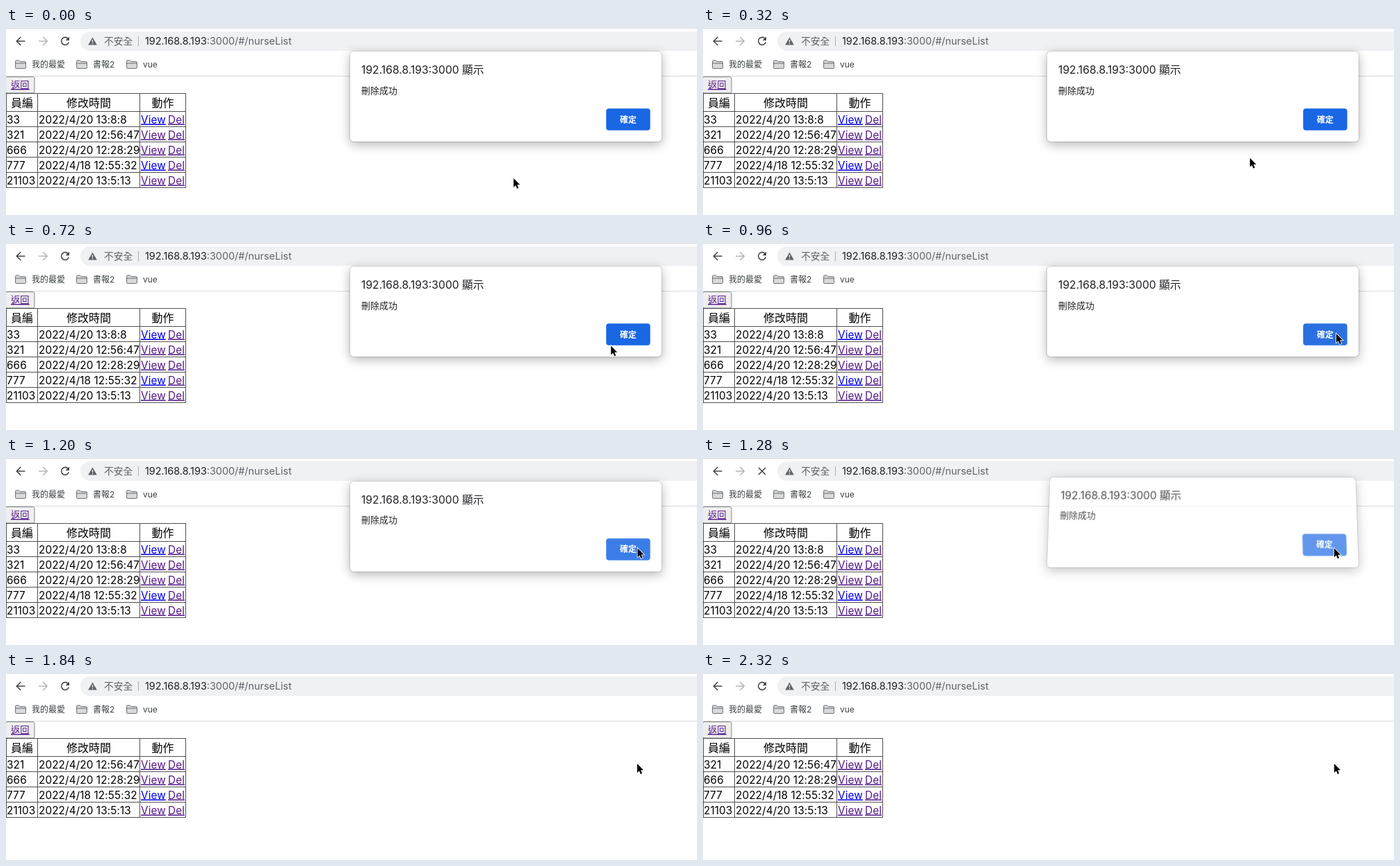
An HTML page that plays this animation: 994x270 px, repeating every 2.4 s.

```html
<!DOCTYPE html>
<html lang="zh-Hant">
<head>
<meta charset="utf-8">
<title>nurseList</title>
<style>
  html, body { margin: 0; width: 100%; height: 100%; overflow: hidden; background: #fff; }
  body { position: relative; }
  svg { position: absolute; left: 0; top: 0; display: block; overflow: visible; }
  text { font-family: Inter, "Noto Sans CJK TC", "Noto Sans CJK", sans-serif; white-space: pre; }
  .icon { fill: none; stroke: #45494d; stroke-width: 1.6; }
  .dim { fill: #5f6368; }
  .mark { font-size: 12px; fill: #3c4043; }
  .head { font-size: 16px; font-weight: 500; text-anchor: middle; }
  .cell { font-size: 15.3px; letter-spacing: .1px; }
  .link { text-decoration: underline; fill: #551a8b; }
  .fresh { fill: #0000ee; }
  #dialog {
    position: absolute; left: 495px; top: 34px; width: 448px; height: 130px;
    border-radius: 5px; background: #fff; transform-origin: 50% 100%;
    box-shadow: 0 0 0 1px rgba(0,0,0,.13), 0 4px 16px rgba(0,0,0,.3);
  }
</style>
</head>
<body>
<svg width="994" height="270">
  <rect width="994" height="1" fill="#d9dbde"/>
  <rect x="107" y="5" width="920" height="28" rx="14" fill="#eff1f3"/>
  <g class="icon">
    <path d="M27.5 19H15.5M21.3 13L15.3 19L21.3 25"/>
    <path d="M47 19H59M53.2 13L59.2 19L53.2 25" stroke="#b4b7ba"/>
    <g id="reload">
      <path d="M89.2 15.2A5.5 5.5 0 1 0 90.3 20.6"/>
      <path d="M91 12.6V18H85.6Z" fill="#45494d" stroke="none"/>
    </g>
    <path id="stop" d="M80 14L90 24M90 14L80 24"/>
  </g>
  <path d="M124.5 13.5L130.8 24.5H118.2Z" class="dim"/>
  <path d="M124.5 17V20.8M124.5 21.8V23.2" stroke="#eff1f3" stroke-width="1.3"/>
  <text x="141" y="24" font-size="13.8" class="dim">不安全</text>
  <rect x="190" y="12" width="1" height="14" fill="#a9adb1"/>
  <text x="200" y="24" font-size="14.4" fill="#202124">192.168.8.193<tspan class="dim">:3000/#/nurseList</tspan></text>

  <g id="folders"></g>
  <text x="37" y="57" class="mark">我的最愛</text>
  <text x="125" y="57" class="mark">書報2</text>
  <text x="197" y="57" class="mark">vue</text>
  <rect y="69" width="994" height="1" fill="#d8dadd"/>

  <rect x="-.5" y="70.5" width="41.5" height="23.5" rx="2.5" fill="#efefef" stroke="#858585"/>
  <text x="7" y="87" font-size="13.33" class="link">返回</text>

  <g id="grid"></g>
  <text x="23" y="113.5" class="head">員編</text>
  <text x="119" y="113.5" class="head">修改時間</text>
  <text x="225.5" y="113.5" class="head">動作</text>
  <g id="rows"></g>
</svg>

<div id="dialog">
  <svg width="448" height="130">
    <text x="16" y="32" font-size="15.7" fill="#202124">192.168.8.193:3000 顯示</text>
    <text x="16" y="60.5" font-size="13" fill="#202124">刪除成功</text>
    <rect id="ok" x="368.3" y="82.3" width="63.4" height="31.4" rx="4"/>
    <text x="400" y="102.5" font-size="12" font-weight="700" text-anchor="middle" fill="#fff">確定</text>
  </svg>
</div>

<svg id="cursor" width="12" height="18">
  <path d="M0 0V13L2.9 10.2L4.9 14.9L7.1 14L5.1 9.3H9.1Z" fill="#000" stroke="#fff" stroke-width="1.6" paint-order="stroke"/>
</svg>

<script>
const LOOP = 2400, CLOSE = 1200, CLOSE_TIME = 200, REFRESH = 1400;
const $ = id => document.getElementById(id);

// id, time, whether View is still unvisited
const records = [
  ['33', '2022/4/20 13:8:8', true],
  ['321', '2022/4/20 12:56:47', false],
  ['666', '2022/4/20 12:28:29', false],
  ['777', '2022/4/18 12:55:32', true],
  ['21103', '2022/4/20 13:5:13', false]
];

// time, x, y of the pointer tip
const path = [
  [0, 730, 217], [560, 829, 166], [880, 911, 131],
  [1120, 911, 131], [1220, 908, 130], [1400, 908, 131]
];

const label = (x, y, str, cls = '') => `<text x="${x}" y="${y}" class="cell ${cls}">${str}</text>`;
const bar = (x, y, w, h) => `<rect x="${x}" y="${y}" width="${w}" height="${h}" fill="#505050"/>`;

function drawTable(list) {
  const bottom = 120 + 22 * list.length;
  let lines = bar(0, 94, 259, 1);
  for (let y = 120; y <= bottom; y += 22) lines += bar(0, y, 259, 1);
  for (const x of [0, 45, 192, 258]) lines += bar(x, 94, 1, bottom - 93);
  $('grid').innerHTML = lines;
  $('rows').innerHTML = list.map(([id, time, fresh], i) => {
    const y = 137.5 + 22 * i;
    return label(1, y, id) + label(47, y, time) +
      label(194, y, 'View', fresh ? 'link fresh' : 'link') + label(233, y, 'Del', 'link');
  }).join('');
}

function pointer(t) {
  const i = path.findIndex(p => p[0] > t);
  if (i < 0) return path[path.length - 1].slice(1);
  const [t0, x0, y0] = path[i - 1], [t1, x1, y1] = path[i];
  const u = (t - t0) / (t1 - t0);
  return [x0 + (x1 - x0) * u, y0 + (y1 - y0) * u];
}

// The sheet rises, its top edge tips back, and it fades.
function poseDialog(p) {
  const tilt = 0.051 * p;
  const m = [1, 0, 0, 0, 0, 1 + tilt, 0, -tilt / 130, 0, 0, 1, 0, 0, -15 * p, 0, 1];
  const box = $('dialog').style;
  box.transform = p > 0 ? `matrix3d(${m.map(v => v.toFixed(6)).join()})` : 'none';
  box.opacity = 1 - p ** 1.8;
  box.visibility = p < 1 ? 'visible' : 'hidden';
}

let rowCount = 0;
function render(t) {
  const [x, y] = pointer(t);
  $('cursor').style.transform = `translate(${x}px, ${y}px)`;
  const hover = x >= 863 && x <= 927 && y >= 116 && y <= 148;
  const pressed = hover && t >= CLOSE;
  $('ok').setAttribute('fill', pressed ? '#3a7ce8' : hover ? '#2b70e0' : '#1a67e4');
  poseDialog(Math.min(1, Math.max(0, (t - CLOSE) / CLOSE_TIME)));

  const loading = t >= CLOSE + 40 && t < REFRESH;
  $('stop').style.display = loading ? '' : 'none';
  $('reload').style.display = loading ? 'none' : '';

  const list = t < REFRESH ? records : records.slice(1);
  if (list.length !== rowCount) {
    rowCount = list.length;
    drawTable(list);
  }
}

$('folders').innerHTML = [13, 101, 173].map(x =>
  `<path transform="translate(${x} 46)" d="M.6 11.4V2.2Q.6 .8 2 .8H5.4L7 2.6H14Q15.4 2.6 15.4 4V11.4Q15.4 12.4 14.4 12.4H1.6Q.6 12.4 .6 11.4ZM.6 5H15.4"
    fill="#d8dadc" stroke="#6b6e72"/>`).join('');

const start = performance.now();
function tick() {
  render((performance.now() - start) % LOOP);
  requestAnimationFrame(tick);
}
tick();
</script>
</body>
</html>
```
